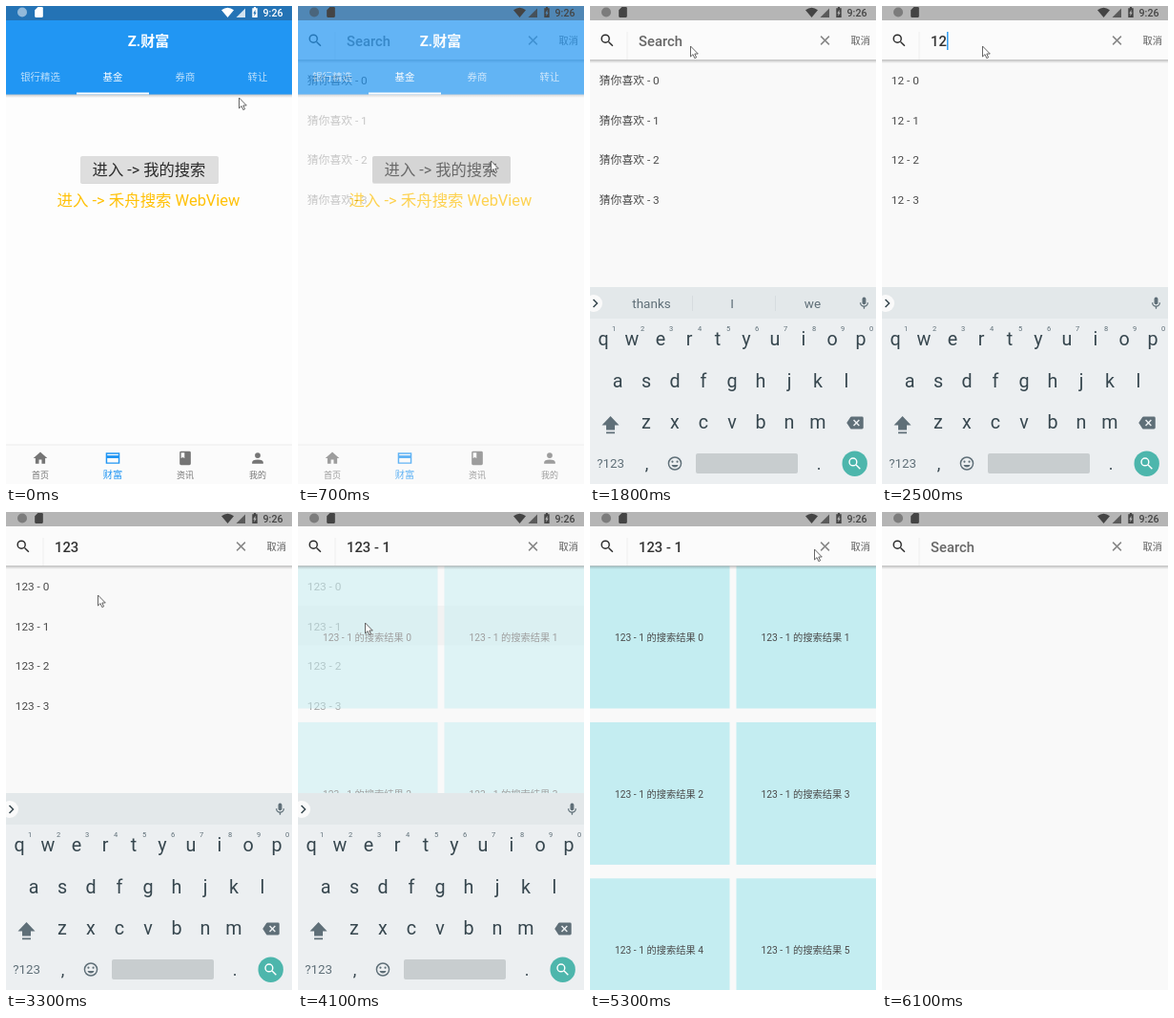
Write an HTML page that moves like this. It is 300 px wide and 500 px high and loops after 6.3 s.

```html
<!DOCTYPE html>
<html lang="zh-CN">
<head>
<meta charset="utf-8">
<title>Search demo</title>
<style>
html, body { margin: 0; width: 100%; height: 100%; overflow: hidden; background: #fdfdfd; }
svg { display: block; width: 300px; height: 500px; }
text { font-family: Roboto, "Noto Sans CJK SC", "Noto Sans CJK", sans-serif; white-space: pre; }
</style>
</head>
<body>
<svg viewBox="0 0 300 500" xmlns="http://www.w3.org/2000/svg">
  <defs>
    <linearGradient id="shade" x1="0" y1="0" x2="0" y2="1">
      <stop offset="0" stop-color="#000" stop-opacity=".24"/>
      <stop offset="1" stop-color="#000" stop-opacity="0"/>
    </linearGradient>
  </defs>
  <g id="home"></g>
  <g id="search">
    <rect width="300" height="500" fill="#f9f9f9"/>
    <g id="list"></g>
    <g id="grid"></g>
    <g id="bar"></g>
  </g>
  <g id="status"></g>
  <rect id="inset" y="294" width="300" height="206" fill="#f9f9f9"/>
  <g id="keyboard"></g>
  <path id="pointer" d="M.5 0v11l2.500-2.400 1.800 4 1.800-.8-1.800-3.800h3.500z" fill="#fff" stroke="#555" stroke-width=".9"/>
</svg>
<script>
const $ = id => document.getElementById(id);
const LOOP = 6300, STEP = 100;

const rect = (x, y, w, h, fill, more = '') =>
  `<rect x="${x}" y="${y}" width="${w}" height="${h}" fill="${fill}" ${more}/>`;
const disc = (x, y, r, fill, more = '') =>
  `<circle cx="${x}" cy="${y}" r="${r}" fill="${fill}" ${more}/>`;
const text = (str, x, y, size, fill, more = '') =>
  `<text x="${x}" y="${y}" font-size="${size}" fill="${fill}" ${more}>${str.replace(/>/g, '&gt;')}</text>`;
const label = (str, x, y, size, fill, more = '') =>
  text(str, x, y, size, fill, `text-anchor="middle" ${more}`);
const medium = 'font-weight="500"';

// Icons on a 24 unit grid
const solid = d => `<path d="${d}" fill-rule="evenodd"/>`;
const line = (d, color = 'currentColor') =>
  `<path d="${d}" fill="none" stroke="${color}" stroke-width="2"/>`;
const ring = (x, y, r) => disc(x, y, r, 'none', 'stroke="currentColor" stroke-width="2"');
const CROSS = 'l12 12m0-12l-12 12';
const ICONS = {
  search: ring(9.5, 9.5, 5.5) + line('M14 14l6 6'),
  home: solid('M10 20v-6h4v6h5v-8h3L12 3 2 12h3v8z'),
  card: line('M3 5h18v14H3z') + solid('M3 8h18v4H3z'),
  book: solid('M6 2h12q2 0 2 2v16q0 2-2 2H6q-2 0-2-2V4q0-2 2-2zM6 4h5v8l-2.500-1.500L6 12z'),
  person: disc(12, 8, 4, 'currentColor') + solid('M4 20v-2q0-4 8-4t8 4v2z'),
  close: line('M6 6' + CROSS),
  erase: solid('M7 3h15q2 0 2 2v14q0 2-2 2H7q-1 0-1.600-.9L0 12l5.400-8.100Q6 3 7 3z') +
    line('M10 8l8 8m0-8l-8 8', '#eceff1'),
  mic: rect(9, 2, 6, 12, 'currentColor', 'rx="3"') + line('M6 11a6 6 0 0 0 12 0M12 17v4'),
  smile: ring(12, 12, 9) + disc(8.5, 9.5, 1.5, 'currentColor') + disc(15.5, 9.5, 1.5, 'currentColor') +
    solid('M7 14h10q-1.500 3.500-5 3.500t-5-3.500z'),
  sd: solid('M10 2h8q2 0 2 2v16q0 2-2 2H6q-2 0-2-2V8z'),
  battery: solid('M7 4h3V2h4v2h3v18H7zM13 7l-4 7.500h2V20l4-7.500h-2z')
};
const icon = (name, cx, cy, size, color) =>
  `<g fill="${color}" color="${color}" transform="translate(${cx - size / 2} ${cy - size / 2}) scale(${size / 24})">${ICONS[name]}</g>`;

function buildHome() {
  const tabs = ['银行精选', '基金', '券商', '转让'];
  const nav = { home: '首页', card: '财富', book: '资讯', person: '我的' };
  return rect(0, 0, 300, 500, '#fdfdfd') +
    rect(0, 92, 300, 4, 'url(#shade)') +
    rect(0, 0, 300, 92.5, '#2196f3') + rect(0, 0, 300, 15, '#2473b5') +
    label('Z.财富', 149.5, 42, 15, '#fff', 'font-weight="700"') +
    tabs.map((s, i) => label(s, 36 + 76 * i, 78, 10.4, '#fff',
      `${medium} opacity="${i === 1 ? 1 : .7}"`)).join('') +
    rect(74, 90.5, 76, 2, '#fff') +
    rect(78, 158, 145, 28, '#000', 'rx="2" opacity=".14"') +
    rect(78, 157, 145, 28, '#dedede', 'rx="2" id="button"') +
    label('进入 -> 我的搜索', 150, 177, 16.3, '#2b2b2b') +
    label('进入 -> 禾舟搜索 WebView', 149.5, 208.5, 16.45, '#ffc107') +
    rect(0, 459, 300, 41, '#fbfbfb') + rect(0, 458.5, 300, 1, '#ececec') +
    Object.entries(nav).map(([name, s], i) => {
      const on = i === 1, color = on ? '#2196f3' : '#757575', x = 36 + 76 * i;
      return icon(name, x, 473, 17.5, color) + label(s, x, 494.3, on ? 10.2 : 9, color);
    }).join('');
}

function buildList() {
  const row = i => text('', 9.8, 82.3 + 41.5 * i, 11.8, '#4a4a4a', 'class="row"');
  return rect(0, 98, 300, 41.5, '#000', 'id="tap" opacity=".06"') + [0, 1, 2, 3].map(row).join('');
}

function buildGrid() {
  let out = '';
  for (let i = 0; i < 6; i++) {
    const x = i % 2 * 153.5, y = 56.5 + 163.4 * (i >> 1);
    out += rect(x, y, 146.5, 149, '#c4edf1') +
      label(`123 - 1 的搜索结果 ${i}`, x + 72.5, y + 78.9, 10.25, '#4a4a4a');
  }
  return out;
}

function buildBar() {
  return rect(0, 56, 300, 4, 'url(#shade)') +
    rect(0, 0, 300, 56, '#fbfbfb') + rect(0, 0, 300, 15, '#b5b5b5') +
    icon('search', 18, 36, 17.5, '#2b2b2b') +
    rect(38.5, 27, 1, 29, '#efefef') +
    text('', 51, 41.5, 14.8, '#666', `${medium} id="query"`) +
    rect(0, 27, 1.4, 19, '#2196f3', 'id="caret"') +
    icon('close', 246.5, 36, 17.5, '#868686') +
    text('取消', 273.5, 40, 10.2, '#5a5a5a');
}

function buildStatus() {
  return disc(17, 6.5, 5, 'currentColor', 'opacity=".5"') +
    icon('sd', 34.5, 6.5, 13, 'currentColor') +
    '<path d="M226 4.200Q232.500-.8 239 4.200l-6.500 7.800z"/>' +
    '<path d="M241.500 12h9.500V2.500z" opacity=".8"/>' +
    icon('battery', 261, 6.5, 13, 'currentColor') +
    text('9:26', 269.5, 10.8, 10.7, 'currentColor', medium);
}

function buildKeyboard() {
  const ink = '#37474f', soft = '#5f6f78';
  const keys = ['qwertyuiop', 'asdfghjkl', 'zxcvbnm'].map((row, r) =>
    [...row].map((k, i) => label(k, 14 + 15 * (r + (r > 1)) + 30 * i, 355.4 + 43.5 * r, 19.7, ink)).join('')).join('');
  const hints = ['thanks', 'I', 'we'].map((s, i) =>
    label(s, 64.5 + 84.5 * i, 316, 13.5, soft) +
    (i ? rect(20 + 87 * i, 303, .8, 16, '#d3d9dc') : '')).join('');
  return rect(0, 294, 300, 206, '#eceff1') + rect(0, 294, 300, 33, '#e3e8ea') +
    disc(4, 311, 9, '#fafafa') +
    `<path d="M3.500 307l4 4-4 4" fill="none" stroke="${ink}" stroke-width="1.500"/>` +
    `<g id="hints">${hints}</g>` + icon('mic', 287.5, 311, 15.5, soft) + keys +
    [...'1234567890'].map((d, i) => label(d, 25 + 30 * i, 340.3, 7.5, soft)).join('') +
    `<path d="M21.500 429l9 9.500h-4.500v5h-9v-5h-4.500zM17 445.500h9v1.800h-9z" fill="${soft}"/>` +
    icon('erase', 278, 436, 17.5, soft) +
    text('?123', 7.3, 483.3, 13.3, soft) +
    label(',', 59.5, 485, 18, ink) + icon('smile', 89, 478.5, 17.5, soft) +
    rect(111, 468, 107, 21, '#c8cdcf', 'rx="2"') + label('.', 240, 485, 18, ink) +
    disc(277.7, 478.7, 13.2, '#4db6ac') + icon('search', 277.7, 478.7, 17, '#fff');
}

const builders = {
  home: buildHome, list: buildList, grid: buildGrid,
  bar: buildBar, status: buildStatus, keyboard: buildKeyboard
};
for (const id in builders) $(id).innerHTML = builders[id]();
const rows = [...document.querySelectorAll('.row')];

const clamp = v => Math.min(1, Math.max(0, v));
const part = (t, from, to) => clamp((t - from) / (to - from));
const smooth = (t, from, to) => { const p = part(t, from, to); return p * p * (3 - 2 * p); };
const easeOut = p => 1 - (1 - p) ** 3;

const show = (id, on) => $(id).setAttribute('visibility', on ? 'visible' : 'hidden');
const fade = (id, v) => $(id).setAttribute('opacity', v);
const paint = (id, color) => $(id).setAttribute('fill', color);

// Pointer moves: begin, end, x, y
const MOVES = [
  [0, 200, 202, 162], [700, 1400, 105, 42], [2900, 3300, 96, 87], [3300, 3700, 70, 116],
  [4300, 4600, 78, 90], [4600, 5300, 235, 39], [5300, 5900, 244, 36]
];
const pointerAt = t => MOVES.reduce(([x, y], [from, to, toX, toY]) => {
  const p = easeOut(part(t, from, to));
  return [x + (toX - x) * p, y + (toY - y) * p];
}, [244, 96]);

function queryAt(t) {
  if (t >= 6000) return '';
  if (t >= 4000) return '123 - 1';
  return '123'.slice(0, Math.max(0, Math.floor((t - 1800) / 300)));
}

function render(t) {
  const query = queryAt(t);
  const result = smooth(t, 3900, 4300) - smooth(t, 5900, 6100);
  const raised = smooth(t, 1600, 1800) - smooth(t, 4500, 4800);

  fade('search', smooth(t, 500, 1050));
  paint('button', t < 500 ? '#dedede' : '#c6c6c6');
  const ink = t < 600 ? '#fff' : '#444';
  paint('status', ink);
  $('status').style.color = ink;

  $('query').textContent = query || 'Search';
  paint('query', query ? '#333' : '#666');
  $('caret').setAttribute('x', 51.5 + 8.3 * query.length);
  show('caret', t >= 2400 && t < 3900 && (t - 2400) % 1000 < 500);

  const stem = query.slice(0, 3) || '猜你喜欢';
  rows.forEach((r, i) => { r.textContent = `${stem} - ${i}`; });
  fade('list', t < 6000 ? 1 - result : 0);
  show('tap', t >= 3900 && t < 4200);
  fade('grid', result);

  fade('keyboard', raised);
  $('keyboard').setAttribute('transform', `translate(0 ${32 * (1 - raised)})`);
  show('hints', t < 2100);
  show('inset', t >= 1800 && t < 4700);

  $('pointer').setAttribute('transform', `translate(${pointerAt(t)})`);
  show('pointer', t < 6100);
}

// The picture advances in fixed steps
const start = performance.now();
let last = -1;
function tick() {
  const t = Math.floor((performance.now() - start) % LOOP / STEP) * STEP;
  if (t !== last) render(last = t);
  requestAnimationFrame(tick);
}
tick();
</script>
</body>
</html>
```
